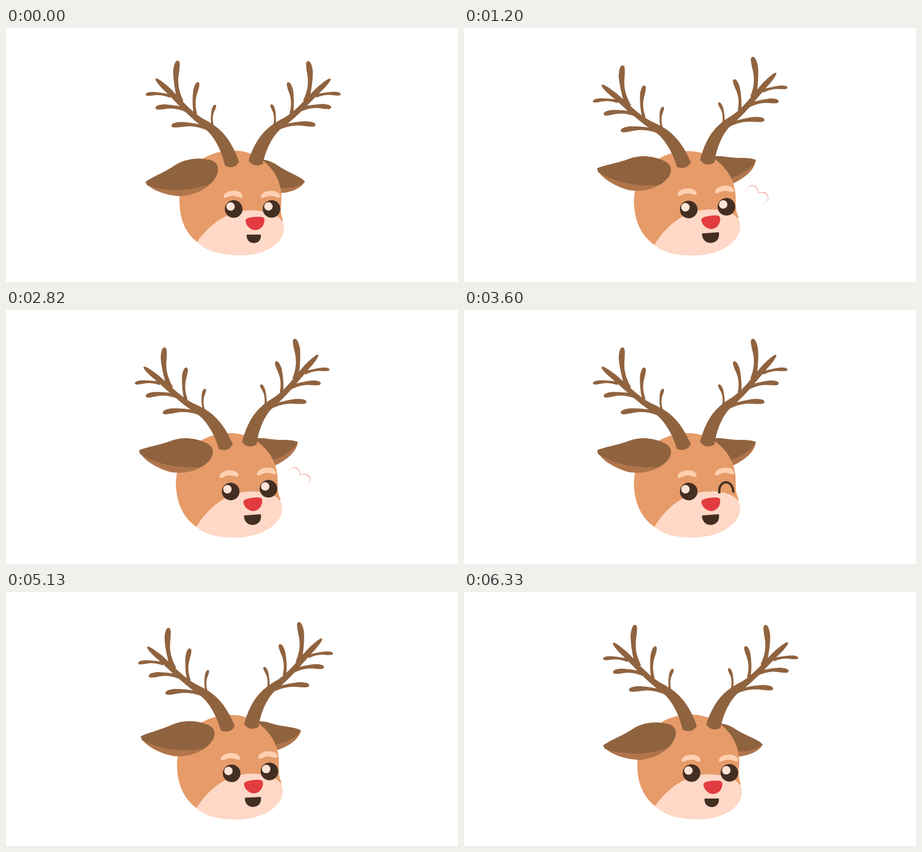
These frames come from a looping animation (800x450 px, 6.42 s). An HTML page:

```html
<!DOCTYPE html>
<html lang="en">
<head>
<meta charset="utf-8">
<title>Winking reindeer</title>
<style>
  html, body { margin: 0; width: 100%; height: 100%; overflow: hidden; background: #fff; }
  svg { display: block; width: 100%; height: 100%; }
</style>
</head>
<body>
<svg viewBox="0 0 800 450">
  <defs>
    <g id="antler" fill="#90633f">
      <path d="M386 244C380 216 366 190 350 178C325 160 300 132 281 113C272 105 262 93 263 90C265 87 275 95 287 105C305 122 322 145 346 160C373 174 394 189 411 237C405 248 395 248 386 244Z"/>
      <path id="twigs"/>
    </g>
    <path id="brow" fill="#ffd0b0" d="M385 299C386 285 418 285 419 298C419 302 414 301 410 299C405 297 399 297 394 299C389 301 385 302 385 299Z"/>
    <g id="eye">
      <circle r="15.6" fill="#432f22"/>
      <circle cx="-5.5" cy="-4.5" r="7.5" fill="#ffe4d6"/>
    </g>
    <path id="love" d="M0 0C-4 -9 -5 -16 -5 -22C-4 -32 4 -35 10 -31C14 -28 15 -24 14.5 -20C20 -23 29 -22 31 -14C32 -5 22 1 0 0Z"/>
  </defs>

  <g id="head">
    <g id="earR">
      <path fill="#b1754b" d="M529 272C520 262 498 256 480 243C465 233 448 231 440 236C425 260 440 290 470 293C495 294 520 288 529 272Z"/>
      <path fill="#90633f" d="M529 272C520 262 498 256 480 243C465 233 448 231 440 236C430 255 440 275 466 281C495 287 520 282 529 272Z"/>
    </g>
    <path fill="#e69b69" d="M402 217C452 217 487.5 257 487.5 300C487.5 315 484 325 490 340L480 370L338 379C315.5 361 307 335 307 306C307 258 345 217 402 217Z"/>
    <path fill="#ffd8c7" d="M338 379C362 345 395 323 434 323C462 323 492 332 492 354C492 384 455 403 415 403C380 402 355 396 338 379Z"/>
    <g id="earL">
      <path fill="#b1754b" d="M247 273C255 266 280 256 298 244C318 231 340 229 362 234C378 238 378 254 370 266C358 285 335 296 310 298C285 297 256 288 247 273Z"/>
      <path fill="#90633f" d="M247 273C255 266 280 256 298 244C318 231 340 229 362 234C378 238 378 254 370 266C366 273 362 276 358 278C325 287 290 292 250 279Z"/>
    </g>
    <use href="#antler" x="1.5"/>
    <use href="#antler" transform="matrix(-1 0 .018 .98 836 2)"/>
    <g id="brows">
      <use href="#brow"/>
      <use href="#brow" x="66.5"/>
    </g>
    <use href="#eye" x="403" y="320.7"/>
    <use id="open" href="#eye" x="470" y="320.5"/>
    <path id="shut" d="M457 328C455.5 302.5 483 302.5 481.7 328" fill="none" stroke="#432f22" stroke-width="4"/>
    <path fill="#e23c40" d="M424 341C424 335 440 334 450 334.5C457 335 458 338 457.5 342C456 353 448 358 441 358C433 358 424 350 424 341Z"/>
    <path id="mouth" fill="#432f22" d="M426 366H451C452 376 446 381 439 381C431 381 425 375 426 366Z"/>
  </g>

  <g id="heart">
    <use href="#love" fill="#ee6555"/>
    <use id="cut" href="#love" fill="#fff"/>
  </g>
</svg>
<script>
const LOOP = 6420, SWING = 20;
const el = id => document.getElementById(id);
const set = (id, value) => el(id).setAttribute('transform', value);
const show = (id, on) => el(id).setAttribute('visibility', on ? 'visible' : 'hidden');
const clamp = v => Math.max(0, Math.min(1, v));

// Outline of a curved twig that thins in the middle and ends in a round bulb
function twig(x0, y0, cx, cy, x1, y1, w0, w1) {
  const left = [], right = [], n = 40;
  for (let i = 0; i <= n; i++) {
    const t = i / n, u = 1 - t;
    const x = u * u * x0 + 2 * u * t * cx + t * t * x1;
    const y = u * u * y0 + 2 * u * t * cy + t * t * y1;
    const dx = u * (cx - x0) + t * (x1 - cx), dy = u * (cy - y0) + t * (y1 - cy);
    const dip = 1 - 0.3 * Math.sin(Math.PI * Math.min(1, t / 0.75));
    const w = (w0 * u + w1 * t) * dip * Math.sqrt(1 - t ** 13) / 2 / Math.hypot(dx, dy);
    left.push((x - dy * w).toFixed(2) + ' ' + (y + dx * w).toFixed(2));
    right.unshift((x + dy * w).toFixed(2) + ' ' + (y - dx * w).toFixed(2));
  }
  return 'M' + left.concat(right).join('L') + 'Z';
}

el('twigs').setAttribute('d', [
  [364, 173, 360, 152, 369.5, 136, 4, 6.5],
  [334, 153, 327, 125, 339, 96, 6, 9.5],
  [308, 131, 293.5, 95, 303, 57.5, 10, 11],
  [358, 179, 325, 166, 291, 173.5, 7, 10],
  [320, 146, 290, 135, 263, 142, 8, 9],
  [290, 121, 268, 113.5, 245.5, 118, 6, 7]
].map(a => twig(...a)).join(''));

// Drawings are held for 90, 90 and 60 ms in turn
const step = t => 3 * Math.floor(t / 240) + Math.min(2, Math.floor(t % 240 / 90));

function draw(ms) {
  const p = step(ms % LOOP) % SWING;
  const s = (1 - Math.cos(2 * Math.PI * p / SWING)) / 2;
  set('head', `rotate(${-8 * s} 413 397)`);
  set('earL', `rotate(${34 * s} 368 253)`);
  set('earR', `rotate(${-41.3 * s} 444 260.5)`);
  set('brows', `translate(0 ${-10.7 * s})`);
  set('mouth', `translate(438.5 373.5) scale(${1 + 0.39 * s}) translate(-438.5 -373.5)`);

  const wink = p >= 5 && p < 14;
  show('open', !wink);
  show('shut', wink);

  const grow = clamp((p - 4.8) / 5.2), drift = clamp((p - 10) / 5);
  const x = 479 + 21 * grow + 5 * drift, y = 319 - 4 * grow - drift;
  show('heart', p >= 5 && p <= 15);
  set('heart', `translate(${x} ${y}) scale(${grow + 0.08 * drift})`);
  set('cut', `translate(${-0.3 * drift} ${0.4 * drift}) scale(${0.99 * drift})`);
}

function tick() {
  draw(performance.now());
  requestAnimationFrame(tick);
}
tick();
</script>
</body>
</html>
```
